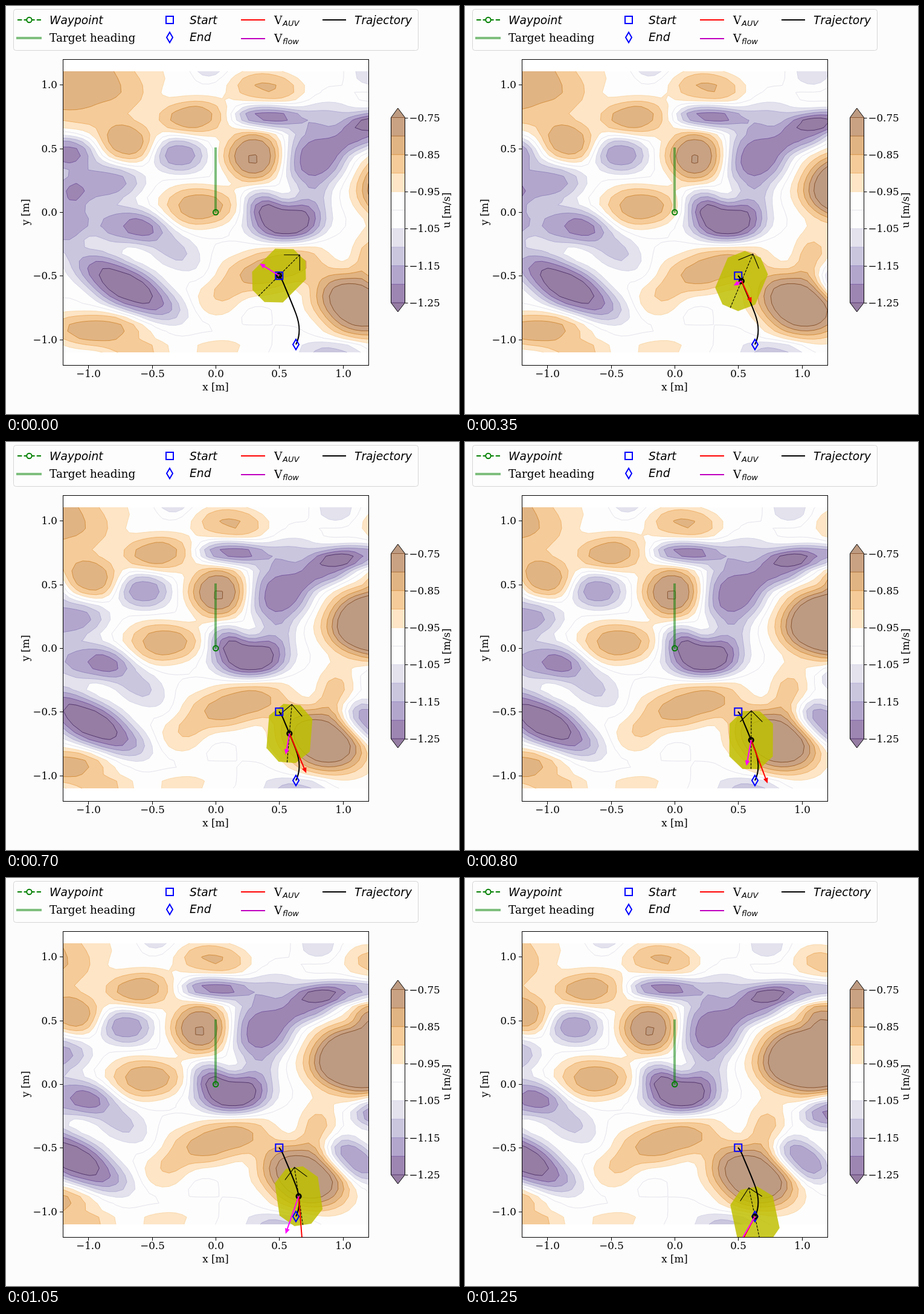
An HTML page with a canvas for the animation above (1.3 s loop, 750x675 px).

```html
<!DOCTYPE html>
<html lang="en">
<head>
<meta charset="utf-8">
<title>Vehicle in a drifting flow field</title>
<style>
html, body { margin: 0; width: 100%; height: 100%; overflow: hidden; background: #fcfcfc; }
canvas, svg { position: absolute; left: 0; top: 0; display: block; }
text { font: 16.7px "DejaVu Serif", serif; fill: #000; }
.key { font-size: 18.5px; }
.it { font: italic 18.7px "DejaVu Sans", sans-serif; font-kerning: none; }
.sub { font: italic 13px "DejaVu Sans", sans-serif; }
.mid { text-anchor: middle; }
.end { text-anchor: end; }
</style>
</head>
<body>
<canvas id="plot" width="750" height="675"></canvas>
<svg width="750" height="675" viewBox="0 0 750 675" fill="none">
  <rect x="12.5" y="5.5" width="670" height="68" rx="4" fill="#fdfdfd" stroke="#d6d6d6"/>
  <g stroke-width="2">
    <path d="M19 23H58" stroke="#008000" stroke-dasharray="7.4 3.2"/>
    <circle cx="38.5" cy="23" r="4.2" fill="#fdfdfd" stroke="#008000"/>
    <path d="M17 53H59" stroke="#7fbf7f" stroke-width="4"/>
    <path d="M265 17h12v12h-12z" stroke="#00f"/>
    <path d="M271 43.5l5 8.5l-5 8.5l-5-8.5z" stroke="#00f"/>
    <path d="M389 23H429" stroke="#f00"/>
    <path d="M389 54H429" stroke="#bf00bf"/>
    <path d="M524 23H563" stroke="#000"/>
  </g>
  <text class="it" x="72" y="30">Waypoint</text>
  <text class="key" x="72" y="59">Target heading</text>
  <text class="it" x="304" y="30">Start</text>
  <text class="it" x="304" y="58">End</text>
  <text class="key" x="444" y="30">V</text><text class="sub" x="458" y="33">AUV</text>
  <text class="key" x="444" y="60">V</text><text class="sub" x="458" y="63">flow</text>
  <text class="it" x="577" y="30">Trajectory</text>

  <rect x="94.5" y="88.5" width="506" height="506" stroke="#000"/>
  <g id="ticks" stroke="#000"></g>
  <g id="labels"></g>
  <text class="mid" x="347" y="636">x [m]</text>
  <text class="mid" transform="translate(38 341) rotate(-90)">y [m]</text>
  <g id="bar"></g>
  <path d="M637.5 184.5L648.8 169L660.5 184.5V491L648.8 506L637.5 491Z" stroke="#000"/>
  <text class="mid" transform="translate(735 338) rotate(-90)">u [m/s]</text>
  <path id="track" d="M452 446C457 451 459 458 462 465S474 493 480 509S488 544 480 560"/>
</svg>
<script>
const FRAMES = 26, STEP = 50, DRIFT = 4.2;
const X0 = 94, Y0 = 108, W = 506, H = 465, COLS = 46, ROWS = 40;

// Bands from low to high; lines sit on the levels between them.
const bands = ['#957da3', '#9d86b2', '#b3a6cd', '#cac6de', '#e3e2ed', '#fdfdfd',
  '#fdfdfd', '#fde5c6', '#f5cb99', '#e1b483', '#c9a283', '#bd9b82'];
const lines = ['#43245f', '#6b4c97', '#8c80b8', '#aba6d0', '#cfcfe4', '#dddde8',
  '#f9d3a0', '#eeaa5c', '#cf862f', '#a05d20', '#7a431c'];

// Eddies: centre, radii, then peak and tilt where not the default
const warm = [
  [115, 130, 133, 75], [200, 226, 48, 36], [312, 185, 60, 32],
  [410, 248, 50, 44, 5.2], [318, 332, 68, 36], [440, 434, 92, 38, 3.6, -12],
  [350, 485, 40, 30, 1.7], [582, 495, 76, 52, 6.5, 20], [150, 535, 90, 30],
  [220, 570, 55, 18, 2.2], [680, 300, 88, 57, 9], [430, 135, 62, 30, 3.1],
  [350, 566, 50, 22, 1.5], [605, 408, 32, 45, 2.2], [695, 140, 50, 30, 2.4],
  [700, 222, 40, 28]
];
const cool = [
  [95, 241, 52, 28, 4.6], [160, 292, 65, 36], [97, 345, 40, 60],
  [195, 363, 68, 32], [270, 395, 70, 32, 2.2, 35], [198, 464, 96, 38, 5.8, 28],
  [288, 246, 46, 32], [430, 183, 54, 21, 4.6], [512, 252, 52, 50, 4.8],
  [590, 210, 50, 28, 4.2, -20], [665, 188, 75, 20], [530, 185, 60, 26, 2.2],
  [508, 318, 30, 26, 1.6], [463, 357, 64, 35, 6.2], [420, 322, 30, 24, 2.6],
  [335, 108, 24, 12, 1.6], [605, 112, 32, 22, 1.7], [540, 570, 58, 18, 2.4],
  [662, 466, 52, 30, 4.4, 30], [710, 388, 48, 26, 4.4]
];

const eddy = sign => ([x, y, rx, ry, peak = 3.6, tilt = 0]) => {
  const r = tilt * Math.PI / 180;
  return { x, y, rx, ry, peak: peak * sign, c: Math.cos(r), s: Math.sin(r) };
};
const eddies = [...warm.map(eddy(1)), ...cool.map(eddy(-1))];

// Flat-topped eddies with steep flanks over a faint ripple
function flow(x, y) {
  let v = .2 * Math.sin(x / 21 + 1) * Math.sin(y / 14);
  for (const o of eddies) {
    const dx = x - o.x, dy = y - o.y;
    const r = Math.hypot((dx * o.c + dy * o.s) / o.rx, (dy * o.c - dx * o.s) / o.ry);
    if (r < 2) v += o.peak * Math.exp(-(r ** 3));
  }
  return v;
}

const g = document.getElementById('plot').getContext('2d');
const gx = i => X0 + W / COLS * i;
const gy = j => Math.round(Y0 + H / ROWS * j);

function contour(v, level) {
  const area = new Path2D(), edge = new Path2D();
  for (let j = 0; j < ROWS; j++) for (let i = 0; i < COLS; i++) {
    const c = [[i, j], [i + 1, j], [i + 1, j + 1], [i, j + 1]]
      .map(([m, n]) => [gx(m), gy(n), v[n][m] - level]);
    const pts = [], cuts = [];
    c.forEach((a, n) => {
      const b = c[(n + 1) % 4];
      if (a[2] >= 0) pts.push(a);
      if (a[2] >= 0 !== b[2] >= 0) {
        const f = a[2] / (a[2] - b[2]);
        const q = [a[0] + (b[0] - a[0]) * f, a[1] + (b[1] - a[1]) * f];
        pts.push(q);
        cuts.push(q);
      }
    });
    if (!pts.length) continue;
    pts.forEach((q, n) => n ? area.lineTo(q[0], q[1]) : area.moveTo(q[0], q[1]));
    area.closePath();
    if (c[0][2] < 0 && cuts.length > 2) cuts.push(cuts.shift());
    for (let n = 0; n < cuts.length; n += 2) {
      edge.moveTo(...cuts[n]);
      edge.lineTo(...cuts[n + 1]);
    }
  }
  return { area, edge };
}

function drawField(shift) {
  const v = Array.from({ length: ROWS + 1 }, (_, j) =>
    Array.from({ length: COLS + 1 }, (_, i) => flow(gx(i) + shift, gy(j))));
  g.fillStyle = bands[0];
  g.fillRect(X0, Y0, W, H);
  const sets = lines.map((_, n) => contour(v, n - 5));
  sets.forEach((s, n) => { g.fillStyle = bands[n + 1]; g.fill(s.area); });
  g.lineWidth = .8;
  sets.forEach((s, n) => { g.strokeStyle = lines[n]; g.stroke(s.edge); });
}

function stroke(path, color, width, dash = []) {
  g.strokeStyle = color;
  g.lineWidth = width;
  g.setLineDash(dash);
  g.stroke(new Path2D(path));
  g.setLineDash([]);
}

function arrow(x, y, dx, dy, color) {
  const len = Math.hypot(dx, dy);
  if (len < 2) return;
  g.save();
  g.translate(x, y);
  g.rotate(Math.atan2(dy, dx));
  stroke(`M0 0H${Math.max(0, len - 6)}`, color, 2);
  g.fillStyle = color;
  g.fill(new Path2D(`M${len} 0l-9 -4v8z`));
  g.restore();
}

const ring = (x, y, r) => `M${x + r} ${y}a${r} ${r} 0 1 1 ${-2 * r} 0a${r} ${r} 0 1 1 ${2 * r} 0z`;
const track = document.getElementById('track');
const trackLen = track.getTotalLength();

// The vehicle speeds up along its track while it turns and slows its turn.
function poseAt(u) {
  const { x, y } = track.getPointAtLength(trackLen * u ** 1.9);
  const d = u - .53;
  return {
    x, y,
    heading: -45 - 57 * (1 - (1 - u) ** 1.5),
    own: [60 * u - 105 * u ** 5, 85 * Math.sin(u * Math.PI / 2)],
    flow: [-6 - 137 * d ** 2 - 84 * d ** 3, 98 * u - 20]
  };
}

function draw(k) {
  const { x, y, heading, own, flow } = poseAt(k / (FRAMES - 1));
  g.clearRect(0, 0, 750, 675);
  g.save();
  g.beginPath();
  g.rect(94, 88, 506, 506);
  g.clip();
  g.fillStyle = '#fff';
  g.fillRect(94, 88, 506, 506);
  drawField(DRIFT * k);

  stroke('M347 342V234', 'rgba(0,128,0,.5)', 4);
  stroke(ring(347.2, 341.2, 4.2), '#008000', 2);

  g.save();
  g.translate(x, y);
  g.rotate(heading * Math.PI / 180);
  g.fillStyle = 'rgba(191,191,0,.84)';
  g.fill(new Path2D('M48 -14V14L27 36H-27L-48 14V-14L-27 -36H27Z'));
  stroke('M-48 0H48', '#000', 1.1, [4, 1.8]);
  stroke('M30 -18.5L48.5 0L30 18.5', '#000', 1.1);
  g.restore();

  stroke(track.getAttribute('d'), '#000', 2);
  stroke('M446.3 440.3h12v12h-12z', '#00f', 2);
  stroke('M480 551.5l5 8.5l-5 8.5l-5 -8.5z', '#00f', 2);
  stroke(ring(x, y, 3.7), '#000', 2.8);
  arrow(x, y, ...own, '#f00');
  arrow(x, y, ...flow, '#f0f');
  g.restore();
}

// Axis ticks, labels and colour bar
const add = (id, markup) => { document.getElementById(id).innerHTML += markup; };
const num = (v, d) => v.toFixed(d).replace('-', '\u2212');
for (let n = -2; n <= 2; n++) {
  const x = Math.round(347 + n * 105.4) + .5, y = Math.round(341 - n * 105.4) + .5;
  add('ticks', `<path d="M${x} 595v5M94 ${y}h-5"/>`);
  add('labels', `<text class="mid" x="${x}" y="614">${num(n / 2, 1)}</text>
    <text class="end" x="85" y="${y + 5.5}">${num(n / 2, 1)}</text>`);
}
const barY = n => 491 - 30.65 * n;
bands.forEach((c, n) => {
  const d = n === 0 ? 'M637.5 491H660.5L648.8 506Z'
    : n === 11 ? 'M637.5 184.5H660.5L648.8 169Z'
    : `M637.5 ${barY(n - 1)}H660.5V${barY(n)}H637.5Z`;
  add('bar', `<path d="${d}" fill="${c}"/>`);
});
lines.forEach((c, n) => add('bar', `<path d="M638 ${barY(n)}H660" stroke="${c}" stroke-width=".8"/>`));
for (let n = 0; n < 6; n++) {
  const y = Math.round(barY(n * 2)) + .5;
  add('ticks', `<path d="M661 ${y}h4.5"/>`);
  add('labels', `<text x="667.5" y="${y + 5.5}">${num(-1.25 + n / 10, 2)}</text>`);
}

let shown = -1;
function tick() {
  const k = Math.floor(performance.now() % (FRAMES * STEP) / STEP);
  if (k !== shown) draw(shown = k);
  requestAnimationFrame(tick);
}
tick();
</script>
</body>
</html>
```
